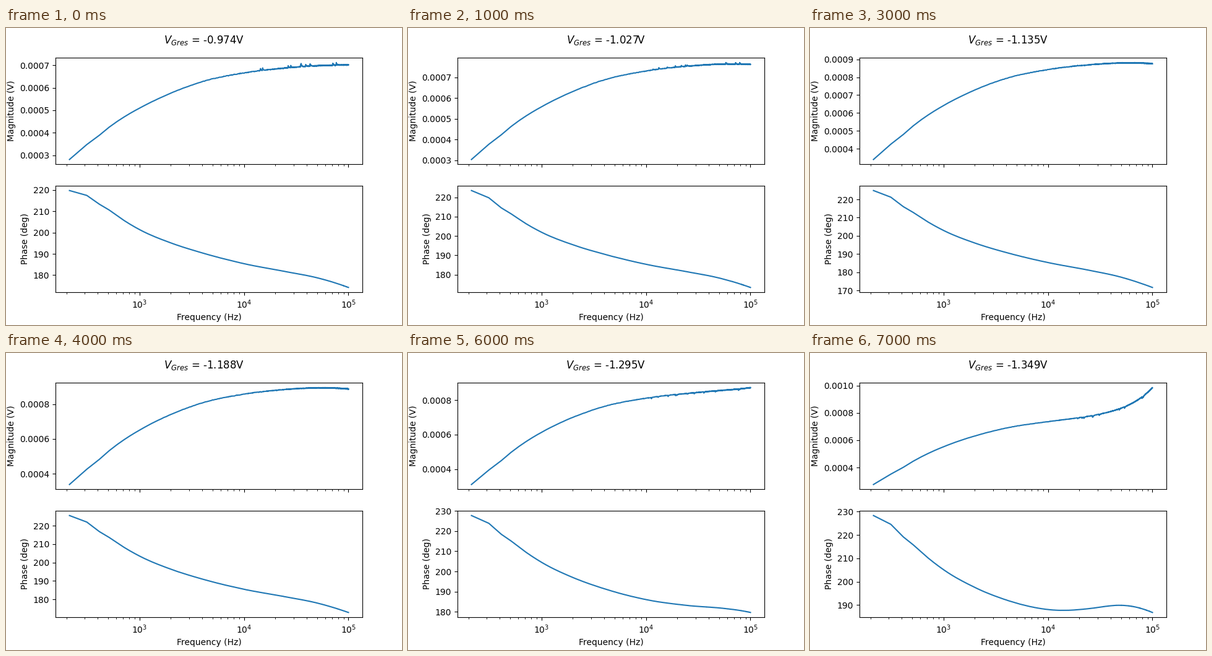
Animation of 640x480 px, one loop 8 s. Source, as a matplotlib script:

```python
import numpy as np
import matplotlib.pyplot as plt
from matplotlib.animation import FuncAnimation

FREQ = np.linspace(214.2, 1e5, 1000)
LOGF = np.log10(FREQ)

# Shared sweep shapes at a few samples: relative magnitude and phase in degrees
KNOTS = LOGF[[0, 1, 2, 3, 5, 8, 18, 38, 98, 250, 500, 999]]
MAG_SHAPE = [0.422, 0.522, 0.584, 0.638, 0.706, 0.767,
             0.866, 0.942, 1, 1.032, 1.044, 1.041]
PHASE_SHAPE = [222.4, 218.8, 213.7, 210.7, 205.7, 201.3,
               195.1, 190.4, 185.3, 181.3, 178, 172.9]

# One value per voltage step
LEVEL = [6.66, 7.30, 7.90, 8.43, 8.57, 8.60, 8.11, 7.31]       # 1e-4 V at 10 kHz
FLARE = [0.013, 0.003, 0, -0.001, -0.006, -0.012, 0.035, 0.308]
START = [219.8, 223.5, 224.2, 224.9, 225.5, 226.0, 227.7, 228.35]
LIFT = [1.6, 0.6, -0.5, -1.6, -0.1, 0, 8.4, 14]


def smooth(vals):
    """Cubic Hermite curve through the knots, sampled at every frequency."""
    v = np.array(vals)
    slope = np.gradient(v, KNOTS, edge_order=2)
    k = np.clip(np.searchsorted(KNOTS, LOGF, side="right") - 1, 0, len(v) - 2)
    h = KNOTS[k + 1] - KNOTS[k]
    t = (LOGF - KNOTS[k]) / h
    return (v[k] * (1 + 2 * t) * (1 - t) ** 2 + v[k + 1] * t * t * (3 - 2 * t)
            + h * t * (1 - t) * (slope[k] * (1 - t) - slope[k + 1] * t))


def low(width):
    """Weight that fades from 1 at the lowest frequency, width in decades."""
    return np.exp(-((LOGF - LOGF[0]) / width) ** 2)


def noise(rng, size):
    return size * np.clip(rng.standard_normal(FREQ.size), -2, 2) * np.clip(LOGF - 2.9, 0, 1)


def magnitude(step):
    rng = np.random.default_rng(step)
    shape = smooth(MAG_SHAPE) - 0.0065 * step * low(0.55)
    mag = LEVEL[step] * (shape + FLARE[step] * (FREQ / 1e5) ** 1.65)
    mag += noise(rng, 0.008)
    # Spikes point up at first and turn downward as the voltage drops
    height = 0.1 - 0.028 * step
    for place in rng.uniform(4.05, 5, 10):
        d = LOGF - place
        mag += height * np.where(d >= 0, np.exp(-np.abs(d) / 0.006), 0)
    return mag * 1e-4


def phase(step):
    rng = np.random.default_rng(50 + step)
    corner = np.interp(step, [6, 7], [70e3, 32e3])
    ph = smooth(PHASE_SHAPE) + 0.85 * step * low(0.95)
    ph += LIFT[step] * (1 - np.exp(-(FREQ / corner) ** 1.4))
    ph += (START[step] - ph[0]) * low(0.2)
    return ph + noise(rng, 0.01)


def show(ax, line, y):
    line.set_ydata(y)
    pad = 0.05 * np.ptp(y)
    ax.set_ylim(y.min() - pad, y.max() + pad)


fig, (top, bottom) = plt.subplots(2, 1, sharex=True, figsize=(6.4, 4.8), dpi=100)
fig.subplots_adjust(left=0.125, right=0.9, bottom=0.11, top=0.9, hspace=0.2)
title = fig.suptitle("")
mag_line, = top.semilogx(FREQ, magnitude(0))
phase_line, = bottom.semilogx(FREQ, phase(0))
top.set_ylabel("Magnitude (V)")
bottom.set_ylabel("Phase (deg)")
bottom.set_xlabel("Frequency (Hz)")


def update(step):
    show(top, mag_line, magnitude(step))
    show(bottom, phase_line, phase(step))
    title.set_text(f"$V_{{Gres}}$ = {-0.9737 - 0.05362 * step:.3f}V")
    return mag_line, phase_line, title


anim = FuncAnimation(fig, update, frames=8, interval=1000, repeat=True,
                     repeat_delay=0, blit=False)
plt.show()
```
